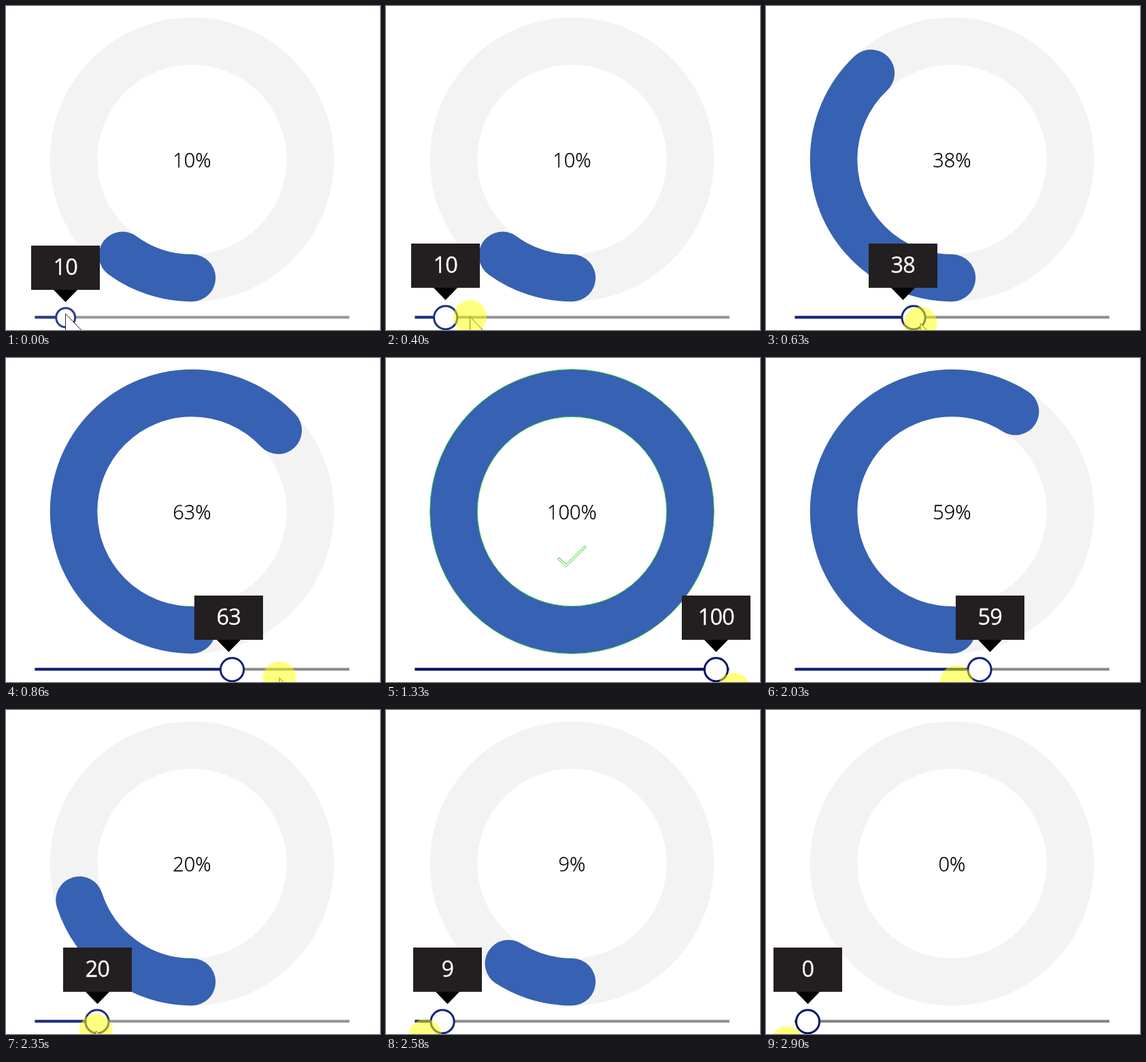
An HTML page for the animation above (3130 ms loop, 550 by 476 pixels).

```html
<!DOCTYPE html>
<html lang="en">
<head>
<meta charset="utf-8">
<title>Progress ring with slider</title>
<style>
  html, body { margin: 0; width: 100%; height: 100%; overflow: hidden; background: #fff; }
  svg { display: block; width: 550px; height: 476px; }
  text { font-family: "Open Sans", "Noto Sans", sans-serif; text-anchor: middle; }
  #label { font-size: 29px; font-weight: 300; fill: #000; stroke: #000; stroke-width: .3px; }
  #tip text { font-size: 32.5px; letter-spacing: -.8px; fill: #fff; stroke: #fff; stroke-width: .3px; }
</style>
</head>
<body>
<svg viewBox="0 0 550 476">
  <g fill="none">
    <circle cx="273.5" cy="225.5" r="174" stroke="#f3f3f3" stroke-width="69.5"/>
    <circle id="arc" cx="273.5" cy="225.5" r="174" stroke="#3761b2" stroke-width="69.5"
      stroke-linecap="round" pathLength="100" transform="rotate(90 273.5 225.5)"/>
    <g id="done" stroke="#32cd32">
      <circle cx="273.5" cy="225.5" r="208.9" stroke-width=".9"/>
      <circle cx="273.5" cy="225.5" r="139.1" stroke-width=".9"/>
      <path d="M253.5 294L264.5 305L293.3 276.7" stroke-width="3.6"/>
      <path d="M254.1 294.6L264.5 305L292.7 277.3" stroke="#fff" stroke-width="2"/>
    </g>
  </g>
  <text id="label" x="273.5" y="237"></text>
  <rect id="track" x="42.5" y="455.3" width="462.5" height="4"/>
  <rect id="fill" x="42.5" y="455.3" height="4"/>
  <circle id="thumb" cy="457.8" fill="#fff" stroke-width="3"/>
  <g id="tip">
    <path d="M-18 413.5H18L0 432Z"/>
    <rect x="-50.5" y="349" width="101" height="65" fill="#231f20"/>
    <text x="-.2" y="392"></text>
  </g>
  <g id="cursor">
    <path d="M0 0V34L8 27L13 39L18 37L13 25H24Z" fill="#fff" stroke="#222"/>
    <circle id="glow" r="24.5" fill="#ff0" fill-opacity=".5"/>
  </g>
</svg>
<script>
const LOOP = 3130;
const LAG = 80;      // thumb behind pointer, ms
const TIP_LAG = 20;  // tooltip behind thumb, ms
const LEFT = 41.5, UNIT = 4.62;

// the picture advances in bursts: [first ms, last ms, steps]
const bursts = [
  [0, 80, 2], [400, 860, 7], [940, 1330, 6],
  [1730, 2190, 7], [2260, 2730, 7], [2820, 2900, 2]
];

// key points of the drag: [ms, position]
const dragX = [
  [0, 87.5], [320, 87.5], [470, 155], [550, 217], [630, 227], [740, 322], [780, 332],
  [860, 402], [1170, 511], [1690, 513], [1957, 314], [2037, 280], [2110, 203],
  [2240, 134], [2350, 132], [2620, 42], [2900, 31]
];
const dragY = [[0, 452], [320, 452], [550, 465], [860, 470], [1330, 487], [2338, 471], [2900, 489]];
const darkness = [[0, 0], [1330, 1], [1730, 1], [2350, .3], [2900, 1]];

const $ = id => document.getElementById(id);
const set = (el, attrs) => { for (const k in attrs) el.setAttribute(k, attrs[k]); };
const clamp = (v, lo, hi) => Math.min(hi, Math.max(lo, v));
const mix = (a, b, k) => a + (b - a) * k;
const rgb = (a, b, k) => `rgb(${a.map((c, i) => Math.round(mix(c, b[i], k)))})`;
const onTrack = x => clamp(x, 61.5, 485.5);

function sample(keys, t) {
  const i = keys.findIndex(k => k[0] > t);
  if (i < 0) return keys[keys.length - 1][1];
  if (i === 0) return keys[0][1];
  const [t0, a] = keys[i - 1], [t1, b] = keys[i];
  return mix(a, b, (t - t0) / (t1 - t0));
}

function snap(t) {
  const [first, last, n] = bursts.filter(b => b[0] <= t).pop();
  const step = (last - first) / (n - 1);
  return first + step * Math.min(n - 1, Math.floor((t - first) / step + .1));
}

function draw(ms) {
  const t = snap(ms % LOOP);
  const idle = t === 0;
  const v = clamp(Math.round((sample(dragX, t - LAG) - LEFT) / UNIT), 0, 100);
  const x = onTrack(LEFT + UNIT * v);
  const tipX = Math.floor(onTrack(sample(dragX, t - LAG - TIP_LAG))) + .5;
  const k = sample(darkness, t);
  const blue = rgb([43, 60, 143], [0, 15, 107], k);

  set($("arc"), {
    "stroke-dasharray": v < 100 ? `${v} 200` : "none",
    visibility: v ? "visible" : "hidden"
  });
  set($("done"), { visibility: v === 100 ? "visible" : "hidden" });
  $("label").textContent = v + "%";

  set($("track"), { fill: rgb([153, 153, 153], [130, 130, 134], k) });
  set($("fill"), { width: x - 42.5, fill: blue });
  set($("thumb"), { cx: x, r: idle ? 14 : 17.1, stroke: blue });

  set($("tip"), { transform: `translate(${tipX} ${idle ? 3 : 0})` });
  $("tip").querySelector("text").textContent = v;

  set($("cursor"), { transform: `translate(${sample(dragX, t)} ${sample(dragY, t)})` });
  set($("glow"), { visibility: idle ? "hidden" : "visible" });
}

const start = performance.now();
function tick() {
  draw(performance.now() - start);
  requestAnimationFrame(tick);
}
tick();
</script>
</body>
</html>
```
